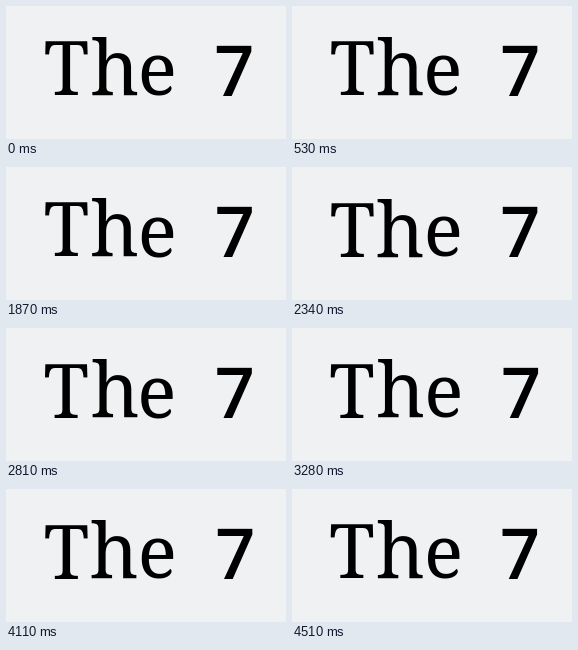
Animation, 280 px wide and 133 px high, one loop 4.55 s. Source, as an HTML page:

```html
<!DOCTYPE html>
<html lang="en">
<head>
<meta charset="utf-8">
<title>The 7</title>
<style>
html, body { margin: 0; width: 100%; height: 100%; overflow: hidden; background: #f0f1f3; }
svg { display: block; width: 100%; height: 100%; }
text { font-family: "Noto Serif", serif; }
.digit { font-family: "Open Sans", "Noto Sans", sans-serif; font-weight: 600; }
</style>
</head>
<body>
<svg viewBox="0 0 280 133">
  <text font-size="74" data-x="37.3" data-y="89.5">T</text>
  <text font-size="76" data-x="84.6" data-y="89.2">h</text>
  <text font-size="73" data-x="132" data-y="89.3">e</text>
  <text class="digit" font-size="70" data-x="208.8" data-y="90">7</text>
</svg>
<script>
const LOOP = 4550, STEP = 33.44, FRAMES = 136;
const glyphs = [...document.querySelectorAll('text')];

function rand(seed) {
  const s = Math.sin(seed * 127.1 + 7.3) * 43758.5453;
  return s - Math.floor(s);
}

// Two seeded sines with whole cycles per loop, so the loop is seamless
function wobble(frame, seed) {
  const wave = n => {
    const cycles = 9 + Math.floor(rand(seed + n) * 12);
    return Math.sin(2 * Math.PI * (cycles * frame / FRAMES + rand(seed + n + .5)));
  };
  return .5 * wave(seed) + .35 * wave(seed + 40);
}

function draw(ms) {
  const t = Math.floor(ms % LOOP / 10) * 10;
  const frame = Math.min(FRAMES - 1, Math.floor((t + 7) / STEP));
  glyphs.forEach((g, i) => {
    const x = +g.dataset.x + wobble(frame, i * 2);
    const y = +g.dataset.y + wobble(frame, i * 2 + 1);
    g.setAttribute('transform', `translate(${x.toFixed(2)} ${y.toFixed(2)})`);
  });
}

const start = performance.now();
function tick() {
  draw(performance.now() - start);
  requestAnimationFrame(tick);
}
tick();
</script>
</body>
</html>
```
